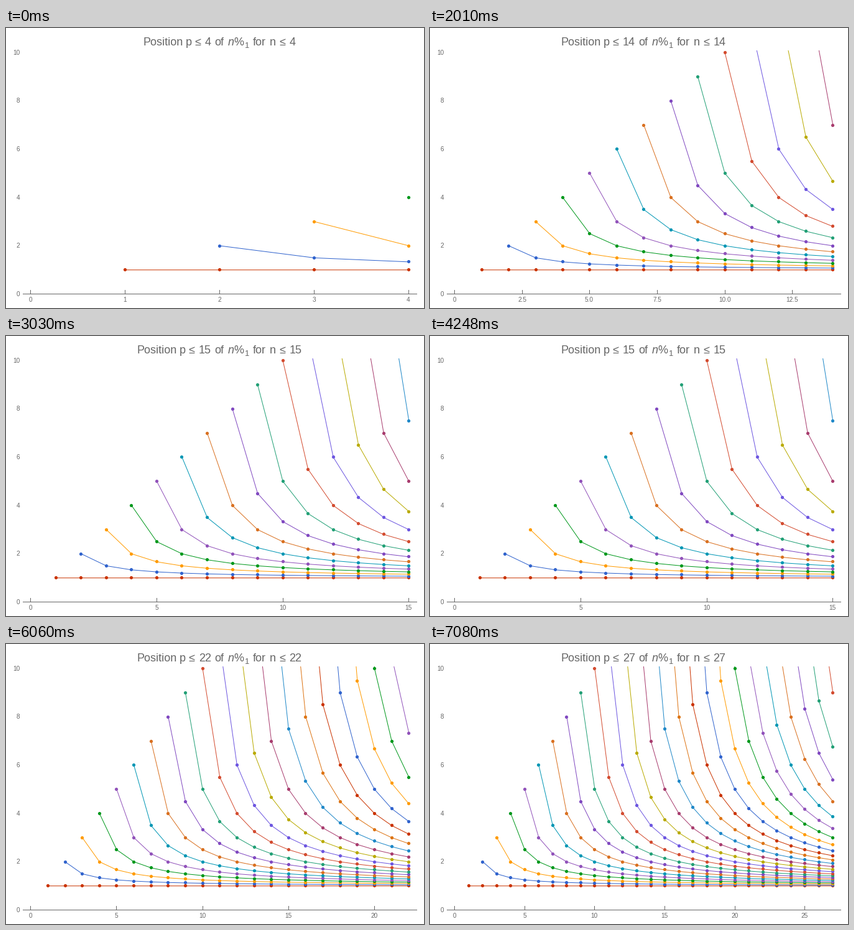
These frames come from a looping animation (672x450 px, 8000 ms). A matplotlib script:

```python
import math

import matplotlib.pyplot as plt
from matplotlib.animation import FuncAnimation
from matplotlib.collections import LineCollection
from matplotlib.patches import Rectangle

W, H, DPI = 672, 450, 100
PX = 72 / DPI
INTERVAL, LOOP = 20, 8000
GREY = "#666666"
X0, X_SPAN = 39.75, 608
Y0, Y_UNIT, Y_MAX = 427.6, 38.8, 10
CLIP_TOP = 36

# start time in ms and largest n
SCENES = [(0, 4), (1000, 8), (2010, 14), (3030, 15),
          (5060, 17), (6060, 22), (7080, 27)]
COLORS = ["#ca3300", "#3063cd", "#ff9b00", "#00981c", "#9152ba",
          "#0096b4", "#d97020", "#8048c0", "#22a076", "#d34b2f",
          "#6c55e0", "#b9aa00", "#a83c6e", "#1f88c8", "#dd7414"]

plt.rcParams["font.family"] = "Liberation Sans"
fig = plt.figure(figsize=(W / DPI, H / DPI), dpi=DPI, facecolor="white")
ax = fig.add_axes([0, 0, 1, 1])
ax.set_xlim(0, W)
ax.set_ylim(H, 0)
ax.axis("off")


def label(x, y, text, size=10, **kw):
    return ax.text(x, y, text, fontsize=size * PX, color=GREY,
                   va="baseline", **kw)


def rule(xs, ys):
    return ax.plot(xs, ys, color=GREY, lw=PX, solid_capstyle="butt",
                   snap=False)[0]


def pixel(pos):
    """Centre of the pixel that holds pos."""
    return math.floor(pos) + 0.5


def y_pos(value):
    return Y0 - Y_UNIT * value


def make_title(top):
    shift = -10 if top > 9 else 0
    parts = [label(x + shift, 28, text, 18)
             for x, text in [(220, "Position"), (289, "p"), (303.5, "≤"),
                             (320, str(top))]]
    parts += [label(x, 28, text, 18)
              for x, text in [(335.3, "of"), (366, "%"), (397, "for"),
                              (423.6, "n"), (439, "≤"), (455.5, str(top))]]
    parts.append(label(356.5, 28, "n", 18, style="italic"))
    parts.append(label(383, 32, "1", 13))
    return parts


def make_ticks(top, x_pos):
    step = next(s for s in (1, 2, 2.5, 5) if top / s < 6)
    parts = []
    for i in range(int(top / step) + 1):
        value = i * step
        text = f"{value:.1f}" if step == 2.5 and i else f"{value:.0f}"
        x = pixel(x_pos(value))
        parts.append(rule([x, x], [421, 427]))
        parts.append(label(x - 0.5, 439.5, text, ha="center"))
    return parts


def make_curves(top, x_pos):
    curves, dots, dot_colors = [], [], []
    for p in range(1, top + 1):
        color = COLORS[(p - 1) % len(COLORS)]
        curve = []
        for n in range(p, top + 1):
            value = n / (n - p + 1)
            x, y = x_pos(n), y_pos(value)
            curve.append((x, y))
            if value <= Y_MAX:
                dots.append((pixel(x), pixel(y)))
                dot_colors.append(color)
        curves.append(curve)
    lines = LineCollection(curves, linewidths=PX, zorder=3, snap=False,
                           colors=[COLORS[i % len(COLORS)] for i in range(top)])
    ax.add_collection(lines, autolim=False)
    lines.set_clip_path(Rectangle((0, CLIP_TOP), W, H - CLIP_TOP,
                                  transform=ax.transData))
    marks = ax.scatter(*zip(*dots), s=(5.2 * PX) ** 2, c=dot_colors,
                       linewidths=0, zorder=4)
    return [lines, marks]


def make_scene(top):
    def x_pos(n):
        return X0 + X_SPAN * n / top

    return make_title(top) + make_ticks(top, x_pos) + make_curves(top, x_pos)


rule([27, 661], [pixel(Y0)] * 2)
for v in range(0, Y_MAX + 1, 2):
    label(22.5, y_pos(v) + 3.2, str(v), ha="right")

scenes = [make_scene(top) for _, top in SCENES]
ax.set_xlim(0, W)
ax.set_ylim(H, 0)


def update(frame):
    current = sum(frame >= start // INTERVAL for start, _ in SCENES) - 1
    for i, parts in enumerate(scenes):
        for part in parts:
            part.set_visible(i == current)
    return scenes[current]


def reset():
    return update(0)


anim = FuncAnimation(fig, update, frames=LOOP // INTERVAL, init_func=reset,
                     interval=INTERVAL, repeat=True, repeat_delay=0)
plt.show()
```
